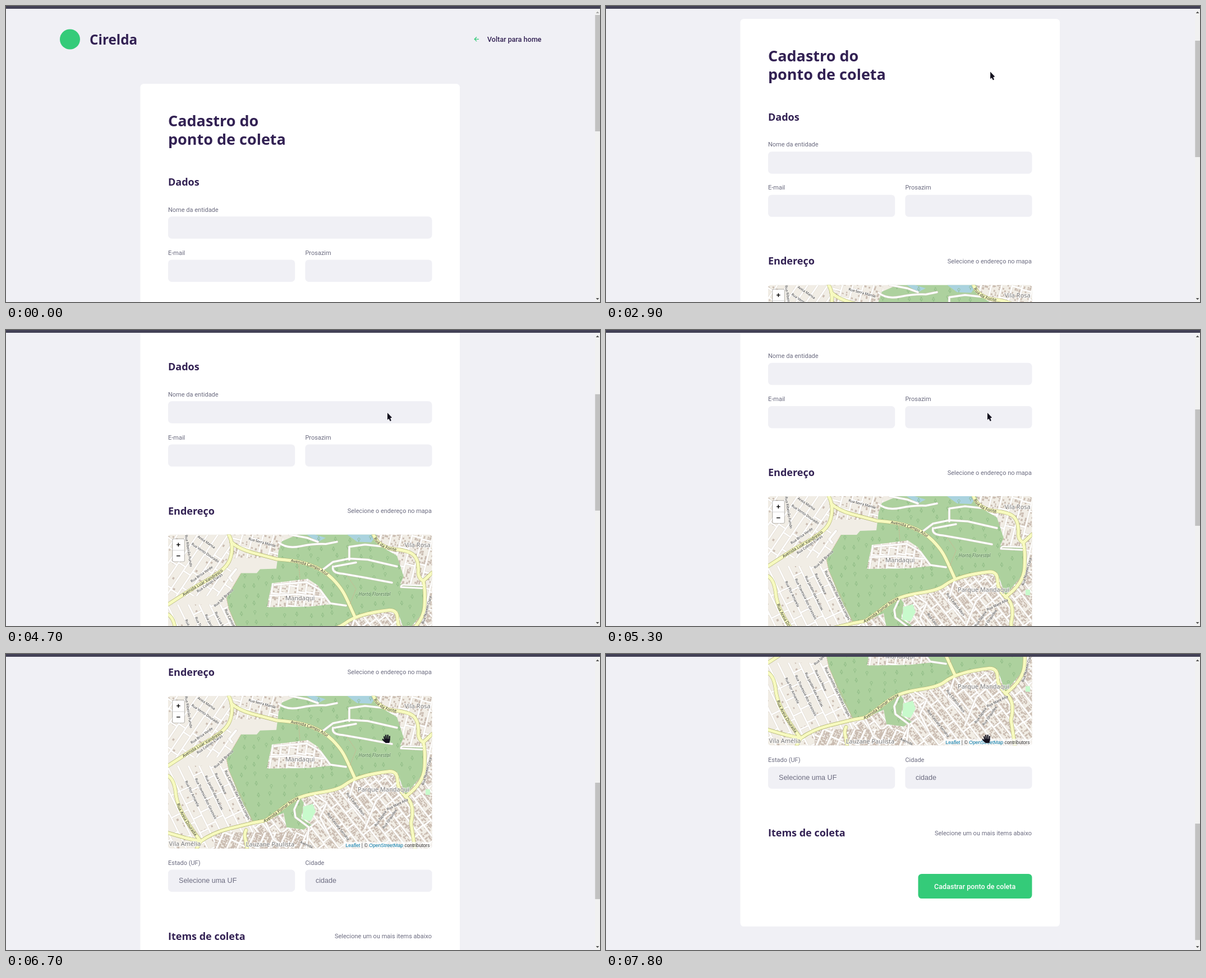
Animation, 1059 px wide and 529 px high, one loop 8000 ms. Source, as an HTML page:

```html
<!DOCTYPE html>
<html lang="pt-BR">
<head>
<meta charset="utf-8">
<title>Cadastro do ponto de coleta</title>
<style>
html, body { margin: 0; width: 100%; height: 100%; overflow: hidden; background: #f0f0f5; }
svg { display: block; }
#stage { width: 1059px; height: 529px; }
text { fill: #6c6c80; font: 11px Roboto, sans-serif; white-space: pre; }
.h1, .h2, .brand { fill: #322153; font: 700 27px "Open Sans", sans-serif; }
.h2 { font-size: 18px; }
.brand { font-size: 24.3px; }
.strong { fill: #322153; font-weight: 500; font-size: 12.57px; }
.value { font: 12.57px "Liberation Sans", Arial, sans-serif; }
.end { text-anchor: end; }
.field { fill: #f0f0f5; height: 39.4px; rx: 6.3px; }
.half { width: 226.2px; }
#map text { font: 6.3px "Noto Sans", sans-serif; fill: #2b2b2b; stroke: #fff; stroke-width: 1.3px; stroke-opacity: .75; paint-order: stroke; }
#map .avenue { font-size: 7.4px; stroke: #f7fabf; }
#map .place { font-size: 11px; fill: #777; stroke-width: 2px; }
#map .park { font-size: 8.7px; font-style: italic; fill: #557a52; stroke: #cfe6c6; }
#map .credit { font: 8.64px "Liberation Sans", Arial, sans-serif; fill: #333; stroke: none; }
#map .zoom { font: 700 13px "Liberation Sans", Arial, sans-serif; fill: #000; stroke: none; text-anchor: middle; }
.link { fill: #0078a8; }
.block { fill: #cabcb1; }
.street, .curb { fill: none; stroke: #fff; stroke-width: 2.7; }
.curb { stroke: #dcd5cc; stroke-width: 3.7; }
#casing path, #paving path { fill: none; stroke-linecap: round; stroke-linejoin: round; }
#trees { fill: none; stroke: #83b47c; stroke-width: .7; }
</style>
</head>
<body>
<svg id="stage" viewBox="0 0 1059 529">
  <g id="page">
    <circle cx="114" cy="59.5" r="18" fill="#34cb79"/>
    <text class="brand" x="149" y="69">Cirelda</text>
    <path d="M843 59.3h-7.6m3.7-3.8l-3.8 3.8 3.8 3.8" fill="none" stroke="#34cb79" stroke-width="1.3"/>
    <text class="strong" x="858" y="64">Voltar para home</text>

    <rect x="239.5" y="139" width="569.5" height="1072" rx="6.3" fill="#fff"/>
    <text class="h1" x="289" y="215.3">Cadastro do</text>
    <text class="h1" x="289" y="248.3">ponto de coleta</text>

    <text class="h2" x="289" y="321.3">Dados</text>
    <text x="289" y="367.5">Nome da entidade</text>
    <rect class="field" x="289" y="376.3" width="470.5"/>
    <text x="289" y="444.5">E-mail</text>
    <rect class="field half" x="289" y="453.5"/>
    <text x="533.4" y="444.5">Prosazim</text>
    <rect class="field half" x="533.4" y="453.5"/>

    <text class="h2" x="289" y="578.5">Endereço</text>
    <text class="end" x="759" y="576">Selecione o endereço no mapa</text>
    <svg id="map" x="289" y="614.5" width="470.5" height="273" viewBox="289 193 470.5 273">
      <clipPath id="frame"><rect x="289" y="193" width="470.5" height="273" rx="5"/></clipPath>
      <clipPath id="wood"><use href="#forest"/></clipPath>
      <g clip-path="url(#frame)">
        <rect x="289" y="193" width="471" height="273" fill="#f1ede5"/>
        <g id="districts"></g>
        <path id="forest" fill="#add19e" fill-rule="evenodd" clip-rule="evenodd" d="M419 262H447L453 255 482 254 486 222 492 205 520 193H660L668 214 697 231 709 268 703 281 746 284 744 332 712 370 698 330 684 328 622 342 570 366 525 376 531 384 526 412 545 424 530 432 500 428 495 402 462 417 440 419 416 372 397 325 393 306ZM474 280L538 272 556 284 578 318 540 322 465 323Z"/>
        <path fill="#c8facc" d="M530 391L547 386 552 400 543 417 528 413ZM748 360h8v10h-8Z"/>
        <path fill="#aad3df" d="M608 193H661L651 207 626 206ZM536 193L550 193 570 199 556 206Z"/>
        <g id="trees" clip-path="url(#wood)"></g>
        <g id="casing"></g>
        <g id="paving"></g>
        <path d="M522 246L524 272M608 266L624 290 613 318M440 417L397 326 393 306 419 262" fill="none" stroke="#d9a58c" stroke-width=".8" stroke-dasharray="2 1.5"/>
        <g id="labels"></g>
        <rect x="296" y="200" width="23" height="42" rx="3.5" fill="#000" fill-opacity=".22"/>
        <rect x="297.3" y="201.3" width="20.6" height="39.6" rx="2" fill="#fff"/>
        <path d="M297.3 221.2h20.6" stroke="#ccc" stroke-width=".8"/>
        <text class="zoom" x="307.4" y="215.6">+</text>
        <text class="zoom" x="307.4" y="235.6">−</text>
        <rect x="602" y="454" width="158" height="12" fill="#fff" fill-opacity=".7"/>
        <text class="credit" x="605.5" y="463"><tspan class="link">Leaflet</tspan> | © <tspan class="link">OpenStreetMap</tspan> contributors</text>
      </g>
    </svg>

    <text x="289" y="916.5">Estado (UF)</text>
    <rect class="field half" x="289" y="925.3"/>
    <text class="value" x="308" y="948.6">Selecione uma UF</text>
    <text x="533.4" y="916.5">Cidade</text>
    <rect class="field half" x="533.4" y="925.3"/>
    <text class="value" x="552" y="948.6">cidade</text>

    <text class="h2" x="289" y="1050.3">Items de coleta</text>
    <text class="end" x="759" y="1048">Selecione um ou mais items abaixo</text>
    <rect x="556.5" y="1117" width="203" height="44" rx="6.3" fill="#34cb79"/>
    <text class="strong" x="657.7" y="1143.6" text-anchor="middle" style="fill:#fff">Cadastrar ponto de coleta</text>
  </g>

  <rect x="1050" y="5" width="9" height="524" fill="#f1f1f1"/>
  <rect id="thumb" x="1050.3" y="16" width="8.7" height="208" fill="#c1c1c1"/>
  <path id="up" d="M1051.7 13h5.8l-2.9-3.2z"/>
  <path d="M1051.7 522h5.8l-2.9 3.2z" fill="#505050"/>

  <g id="cursor">
    <path id="arrow" d="M0 0V12.6L2.6 10.6 4.8 15 6.9 14 5.1 9.6 8.2 8.6Z" fill="#14121f" stroke="#fff" stroke-opacity=".6" stroke-width=".8" paint-order="stroke"/>
    <g id="hand" transform="translate(-1 -4)" fill="none" stroke="#14121f" stroke-width="2.3" stroke-linecap="round" stroke-linejoin="round">
      <path d="M-4.8 1L-3.2 7M-1.9-1.6L-1 6M1.7-1.8L1.6 6M4.9 .3L4.4 7M-7.2 5.6L-3.6 9.5"/>
      <path d="M-3.6 6H4.4L3.6 10.8H-2Z" fill="#14121f"/>
    </g>
  </g>
  <rect width="1059" height="5" fill="#434156"/>
</svg>
<script>
const $ = id => document.getElementById(id);

function add(parent, tag, attrs, text) {
  const node = document.createElementNS('http://www.w3.org/2000/svg', tag);
  for (const key in attrs) node.setAttribute(key, attrs[key]);
  if (text) node.textContent = text;
  return parent.appendChild(node);
}

let seed = 7;
const rand = () => (seed = seed * 16807 % 2147483647) / 2147483647;

// Fills a box with rotated streets and scattered buildings.
function district(x, y, width, height, angle, gap, density) {
  const viewBox = [-width / 2, -height / 2, width, height].join(' ');
  const box = add($('districts'), 'svg', { x, y, width, height, viewBox });
  const plan = add(box, 'g', { transform: `rotate(${angle})` });
  const reach = Math.hypot(width, height) / 2;
  let streets = '', blocks = '';
  for (let u = -reach; u < reach; u += gap) {
    streets += `M${u} ${-reach}V${reach}`;
    for (let v = -reach + rand() * 20; v < reach; v += 25 + rand() * 30) streets += `M${u} ${v}h${gap}`;
    for (let a = u + 2; a < u + gap - 2; a += 3.6)
      for (let b = -reach; b < reach; b += 3.8)
        if (rand() < density) {
          const w = 2 + rand() * 1.8, h = 2.2 + rand() * 2;
          blocks += `M${a + rand()} ${b + rand()}h${w}v${h}h${-w}z`;
        }
  }
  add(plan, 'path', { class: 'block', d: blocks });
  add(plan, 'path', { class: 'curb', d: streets });
  add(plan, 'path', { class: 'street', d: streets });
}

function road(d, width = 3, color = '#fff', edge = '#d8d0c8') {
  add($('casing'), 'path', { d, stroke: edge, 'stroke-width': width + 1.2 });
  return add($('paving'), 'path', { d, stroke: color, 'stroke-width': width });
}

// A yellow road, with its name set along it.
function avenue(d, name, startOffset) {
  const path = road(d, 5.4, '#f7fabf', '#adaf6c');
  if (!name) return;
  path.id = name.replace(/ /g, '-');
  const text = add($('labels'), 'text', { class: 'avenue', dy: 2.6 });
  add(text, 'textPath', { href: '#' + path.id, startOffset }, name);
}

const label = (text, x, y, angle = 0, kind = '') =>
  add($('labels'), 'text', { class: kind, transform: `translate(${x} ${y}) rotate(${angle})` }, text);

// Names of parallel streets, one step apart.
const names = (list, x, y, dx, dy, angle) =>
  list.split(', ').forEach((name, i) => label(name, x + dx * i, y + dy * i, angle));

for (let y = 200; y < 440; y += 17)
  for (let x = 395; x < 750; x += 23) {
    const shape = rand() < .5 ? 'a2 2.3 0 1 1 .1 0' : 'h-2.2l2.2-5 2.2 5z';
    add($('trees'), 'path', { d: `M${x + rand() * 12} ${y + rand() * 8}v-3${shape}` });
  }

district(289, 318, 160, 148, -26, 17, .03);
district(289, 193, 112, 110, 34, 15, .06);
district(404, 193, 90, 42, 15, 18, .3);
district(465, 270, 114, 54, 8, 15, .5);
district(655, 193, 105, 150, 14, 18, .45);
district(440, 335, 320, 131, -38, 16, .66);
district(372, 437, 165, 29, 24, 17, .85);

road('M486 207Q500 219 525 214T570 210L590 206M556 206L537 199 505 193');
road('M612 238V215L640 211 668 214M583 250Q580 262 600 263L640 270 688 279');
road('M562 258L583 242 612 236 645 238 697 250M586 250L624 243');
road('M478 283L536 278 560 292 578 316 606 320M471 302L520 300 566 305');
road('M704 287Q704 282 712 283L744 284M704 287L742 289', 2.4);
road('M410 255L398 270 403 276', 4);
road('M524 374L514 396 516 410 540 428 535 466M462 417L477 450 500 464');
road('M550 370L572 384 560 410 575 440M622 342L610 380 640 410M700 345L660 380 640 430');
avenue('M428 433Q424 440 427 450L430 466');
avenue('M289 438L320 447 347 453 340 466');
avenue('M744 276L760 261');
avenue('M289 318L340 285C386 259 402 250 403 216Q403 204 397 193', 'Avenida Luar Vandresco', 31);
avenue('M402 207Q414 218 438 225L483 237C530 240 560 250 582 272S606 306 622 340', 'Avenida Campo Azul', 112);
avenue('M289 336Q299 342 302 362C304 390 318 414 347 453', 'Rua Areia Dourada', 54);
avenue('M347 453Q368 438 395 431L440 420 462 416C490 399 500 384 525 374S586 366 604 352 650 332 684 328Q698 328 698 344T714 374 722 420L729 466', 'Avenida Pomar Norte', 119);
avenue('M655 193Q663 214 690 219C726 222 737 230 735 262Q736 272 744 276 748 294 746 322T712 373', 'Rua da Fonte', 6);

names('Rua Flor Amarela, Rua Travessia dos Girassóis, Rua Jardim das Acácias, Rua Lua Nova, Rua Caminho das Pedras Longas', 319, 346, 17.6, -4.6, 64);
names('Areia Mansa, Rua Vento Dourado', 341, 198, -11, 13, 34);
names('Rua Brisa Verde, Rua Colinas Claras', 331, 279, 11, 18, -35);
names('Rua Cascata Serrana, Rua Cedros Altos', 572, 404, 34, -36, 52);
names('Rua Tapera, Rua Orquídea', 660, 427, 14, 4, -55);
label('Rua Ribeirão Fundo', 319, 194, 81);
label('Rua Ipê Branco', 373, 323, -43);
label('Rua Serra Mansa', 432, 202.5, 15);
label('Rua Maré Alta', 680, 398, -26);
label('Rua Nuvem Clara', 745, 353, -74);
label('Avenida', 524, 456, 24);
label('Vila Rosa', 710.5, 215.5, 0, 'place');
label('Mandaqui', 498, 310.5, 0, 'place');
label('Parque Mandaqui', 627, 364, 0, 'place');
label('Lauzane Paulista', 427.5, 462, 0, 'place');
label('Vila Amélia', 290.5, 461.5, 0, 'place');
label('Horto Florestal', 628.5, 302, 0, 'park');

// Each scroll gesture: start in ms, length in 100 ms ticks, distance.
const flicks = [
  [600, 9, 66], [1500, 3, 45.5], [2800, 7, 32], [3800, 3, 21.5], [4200, 2, 42], [4500, 2, 42], [4800, 2, 42],
  [5200, 3, 79.5], [6100, 3, 153], [6500, 4, 32.5], [7100, 2, 55], [7400, 1, 30], [7600, 2, 83]
];
const ramp = (t, from, to) => Math.min(1, Math.max(0, (t - from) / (to - from)));

function draw(now) {
  const t = Math.floor(now % 8000 / 100) * 100;
  const scroll = flicks.reduce((sum, [from, ticks, far]) => sum + far * ramp(t, from, from + ticks * 100), 0);
  const enter = ramp(t, 600, 1200), drift = ramp(t, 2800, 3500), settle = ramp(t, 5800, 6200);
  const x = 780 - 94 * enter - 6 * drift;
  const y = -25 + 137.5 * enter + 35.5 * drift + 3 * settle;
  const overMap = t >= 6500;
  $('page').setAttribute('transform', `translate(0 ${-scroll})`);
  $('thumb').setAttribute('y', 16 + scroll * .3966);
  $('up').setAttribute('fill', scroll ? '#505050' : '#a3a3a3');
  $('cursor').setAttribute('transform', `translate(${x} ${y})`);
  $('arrow').style.display = overMap ? 'none' : '';
  $('hand').style.display = overMap ? '' : 'none';
}

const start = performance.now();
function tick() {
  draw(performance.now() - start);
  requestAnimationFrame(tick);
}
tick();
</script>
</body>
</html>
```
